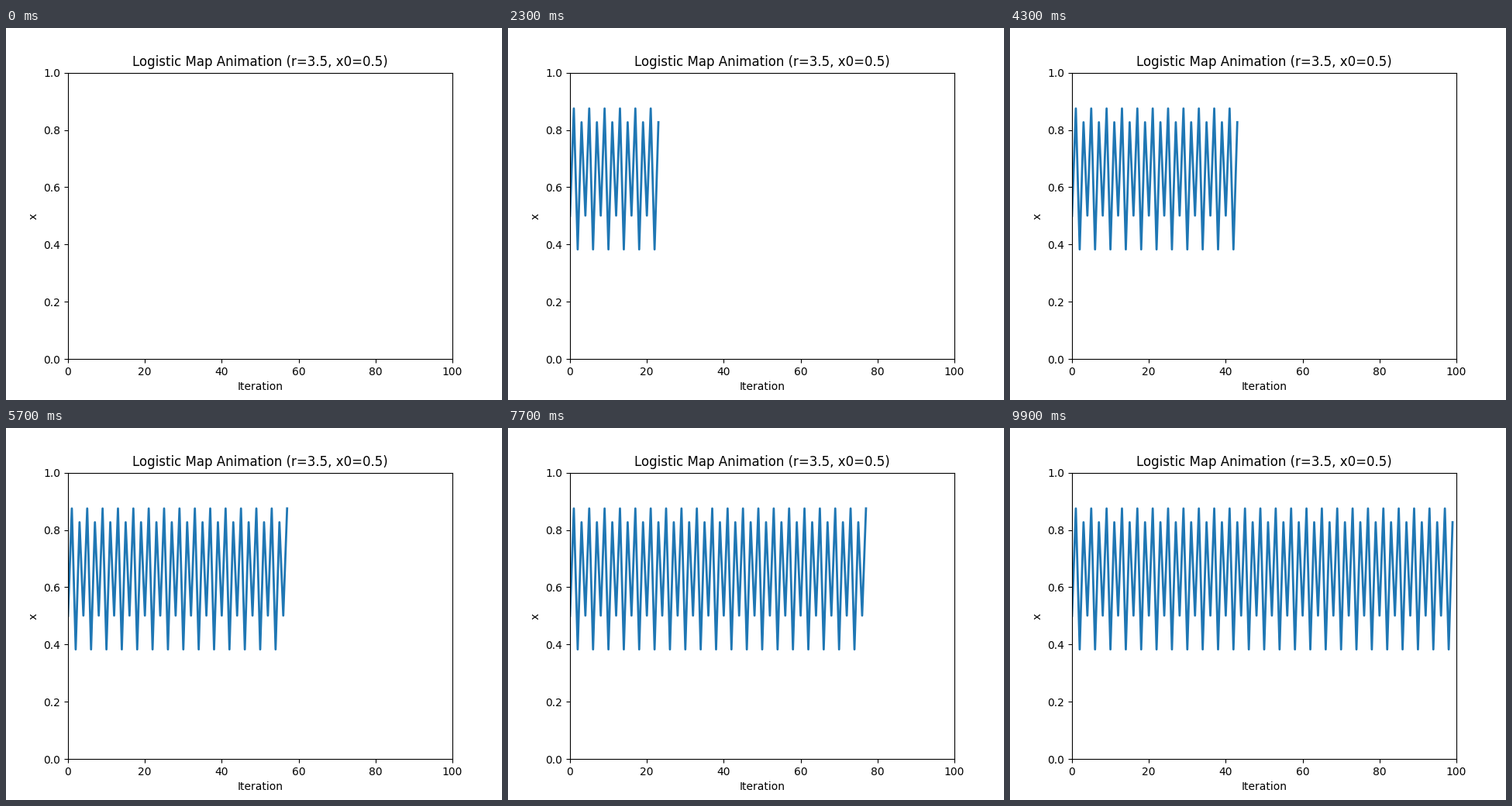
Animation of 640x480 px, one loop 10000 ms. Source, as a matplotlib script:

```python
import matplotlib.pyplot as plt
import numpy as np
from matplotlib.animation import FuncAnimation

R, X0, STEPS = 3.5, 0.5, 100


def logistic_map(r, x0, count):
    xs = np.empty(count)
    xs[0] = x0
    for i in range(1, count):
        xs[i] = r * xs[i - 1] * (1 - xs[i - 1])
    return xs


xs = logistic_map(R, X0, STEPS)
steps = np.arange(STEPS)

fig, ax = plt.subplots(figsize=(6.4, 4.8), dpi=100)
ax.set_xlim(0, STEPS)
ax.set_ylim(0, 1)
ax.set_title(f"Logistic Map Animation (r={R}, x0={X0})")
ax.set_xlabel("Iteration")
ax.set_ylabel("x")
line, = ax.plot([], [], lw=2)


def init():
    line.set_data([], [])
    return line,


def update(i):
    line.set_data(steps[:i + 1], xs[:i + 1])
    return line,


anim = FuncAnimation(fig, update, frames=STEPS, init_func=init,
                     interval=100, repeat=True, blit=False)
plt.show()
```
